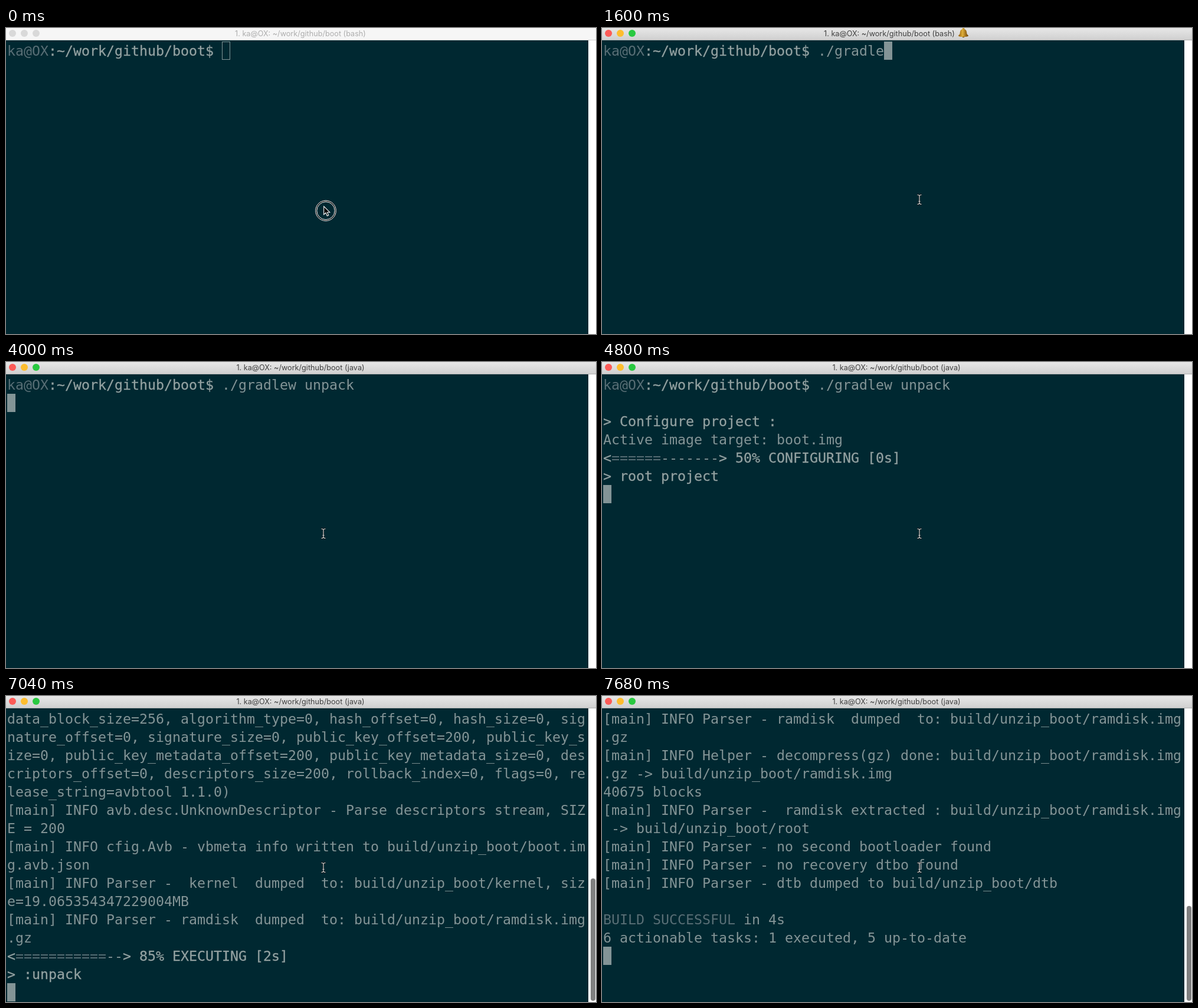
Recreate the animation shown at these times as an HTML page with a canvas. Size 1000x520 px, loop 8 s.

```html
<!DOCTYPE html>
<html lang="en">
<head>
<meta charset="utf-8">
<title>Terminal</title>
<style>
html, body { margin: 0; width: 100%; height: 100%; overflow: hidden; background: #002831; }
canvas { display: block; width: 1000px; height: 520px; }
</style>
</head>
<body>
<canvas id="stage" width="1000" height="520"></canvas>
<script>
const ctx = document.getElementById('stage').getContext('2d');
const LOOP = 8000, COLS = 70, CELL = 14, ROW = 31, LEFT = 2, TOP = 23;
const MONO = '23.25px "DejaVu Sans Mono", monospace';
const SANS = '12.65px Inter, sans-serif';
const BG = '#002831', FG = '#839496';
// Style marks inside terminal text: | plain, * bold, ^ green
const STYLES = { '|': FG, '*': '#93a1a1', '^': '#586e75' };

const PROMPT = '^ka@OX*:~/work/github/boot$| ';
const PROMPT_COLS = 26;
const COMMAND = './gradlew unpack';
const TYPED = [[0, 0], [1120, 1], [1280, 3], [1600, 8], [2240, 10], [2880, 11], [3040, 13], [3200, 15], [3360, 16]];

const wrap = line => line.match(new RegExp(`.{1,${COLS}}`, 'g')) || [''];
const LOG = [
  'data_block_size=256, algorithm_type=0, hash_offset=0, hash_size=0, signature_offset=0, signature_size=0, public_key_offset=200, public_key_size=0, public_key_metadata_offset=200, public_key_metadata_size=0, descriptors_offset=0, descriptors_size=200, rollback_index=0, flags=0, release_string=avbtool 1.1.0)',
  '[main] INFO avb.desc.UnknownDescriptor - Parse descriptors stream, SIZE = 200',
  '[main] INFO cfig.Avb - vbmeta info written to build/unzip_boot/boot.img.avb.json',
  '[main] INFO Parser -  kernel  dumped  to: build/unzip_boot/kernel, size=19.065354347229004MB',
  '[main] INFO Parser - ramdisk  dumped  to: build/unzip_boot/ramdisk.img.gz',
  '[main] INFO Helper - decompress(gz) done: build/unzip_boot/ramdisk.img.gz -> build/unzip_boot/ramdisk.img',
  '40675 blocks',
  '[main] INFO Parser -  ramdisk extracted : build/unzip_boot/ramdisk.img -> build/unzip_boot/root',
  '[main] INFO Parser - no second bootloader found',
  '[main] INFO Parser - no recovery dtbo found',
  '[main] INFO Parser - dtb dumped to build/unzip_boot/dtb',
  '',
  '^BUILD SUCCESSFUL| in 4s',
  '6 actionable tasks: 1 executed, 5 up-to-date'
].flatMap(wrap);

function status(percent, phase, secs, task) {
  const done = Math.floor(percent * 13 / 100);
  const bar = '*<^' + '='.repeat(done) + '|' + '-'.repeat(13 - done);
  return [`${bar}*> ${percent}% ${phase} [${secs}s]`, `*> ${task}`];
}

// Terminal rows, cursor cell and scrollback length at time t
function screen(t) {
  if (t >= 7680) return { rows: LOG.slice(11), col: 0, total: 49 };
  if (t >= 7040) {
    const shift = t < 7200 ? 0 : 2;
    const rows = LOG.slice(shift, shift + 13).concat(status(85, 'EXECUTING', 2, ':unpack'));
    return { rows, col: 0, total: 38 + shift };
  }
  const count = TYPED.filter(k => t >= k[0]).pop()[1];
  const rows = [PROMPT + COMMAND.slice(0, count)];
  if (t < 3520) return { rows, col: PROMPT_COLS + count, row: 0 };
  if (t >= 4800) {
    rows.push('', '*> Configure project :', 'Active image target: boot.img');
    if (t < 4960) rows.push(...status(50, 'CONFIGURING', 0, 'root project'));
    else if (t < 5120) rows.push(...status(0, 'EXECUTING', 0, 'IDLE'));
    else rows.push(...status(85, 'EXECUTING', t < 5760 ? 0 : t < 6720 ? 1 : 2, ':unpack'));
  } else if (t >= 4640) {
    rows.push('', '*> Connecting to Daemon');
  }
  return { rows, col: 0 };
}

function drawRow(text, row) {
  let col = 0, mark = '|';
  for (const ch of text) {
    if (STYLES[ch]) { mark = ch; continue; }
    const x = LEFT + col++ * CELL, y = TOP + row * ROW + 24;
    ctx.fillStyle = ctx.strokeStyle = STYLES[mark];
    ctx.fillText(ch, x, y);
    if (mark === '*') ctx.strokeText(ch, x, y);
  }
}

function circle(x, y, r, fill, stroke, width = 1) {
  ctx.beginPath();
  ctx.arc(x, y, r, 0, Math.PI * 2);
  ctx.lineWidth = width;
  if (fill) { ctx.fillStyle = fill; ctx.fill(); }
  if (stroke) { ctx.strokeStyle = stroke; ctx.stroke(); }
}

function drawBell(x, y) {
  ctx.save();
  ctx.translate(x, y);
  circle(0, 5.5, 2.2, '#6b430c');
  const gold = ctx.createLinearGradient(-7, 0, 7, 0);
  gold.addColorStop(0, '#a06a12');
  gold.addColorStop(0.4, '#e0b03a');
  gold.addColorStop(1, '#7d4e0c');
  ctx.fillStyle = gold;
  ctx.fill(new Path2D('M0-8.500C2-8.500 2-7 2-6.500C6-5 5.500-1 6 1.500C6.500 3 8.500 3.500 8.500 5C6 7-6 7-8.500 5C-8.500 3.500-6.500 3-6 1.500C-5.500-1-6-5-2-6.500C-2-7-2-8.500 0-8.500Z'));
  ctx.restore();
}

function drawTitleBar(t) {
  const active = t >= 160, bell = t >= 1600 && t < 2240;
  const shade = ctx.createLinearGradient(0, 0, 0, 20);
  shade.addColorStop(0, active ? '#e7e7e7' : '#f6f6f6');
  shade.addColorStop(1, active ? '#d0d0d0' : '#f6f6f6');
  ctx.fillStyle = shade;
  ctx.fillRect(0, 0, 1000, 20);
  ctx.fillStyle = active ? '#b0b0b0' : '#d0d0d0';
  ctx.fillRect(0, 20, 1000, 1);

  const lights = active ? ['#fc5b57', '#fdbd2e', '#29c940'] : Array(3).fill('#d9d9d9');
  lights.forEach((fill, i) => circle(11 + 20 * i, 9, 6, fill));

  ctx.font = SANS;
  ctx.textAlign = 'center';
  ctx.fillStyle = active ? '#404040' : '#adadad';
  ctx.fillText(`1. ka@OX: ~/work/github/boot (${t < 4000 ? 'bash' : 'java'})`, bell ? 487 : 499, 14);
  ctx.textAlign = 'left';
  if (bell) drawBell(612.5, 8.5);
}

function drawArrow(x, y) {
  ctx.save();
  ctx.translate(x, y);
  const arrow = new Path2D('M.7 1V15L4 12L6.300 17.300L8.700 16.300L6.500 11.200H10.800Z');
  ctx.fillStyle = '#000';
  ctx.strokeStyle = '#fff';
  ctx.lineWidth = 1.1;
  ctx.fill(arrow);
  ctx.stroke(arrow);
  ctx.restore();
}

function drawPointer(t) {
  if (t < 160) {
    circle(542, 310.5, 16.5, null, '#000', 2);
    circle(542, 310.5, 17.3, null, '#fff');
    circle(542, 310.5, 15.2, null, '#fff');
    drawArrow(538, 302);
  } else if (t < 320) {
    drawArrow(532, 283);
  } else {
    const beam = new Path2D('M534.500 283.500Q538 283.500 538 286V297Q538 299.500 534.500 299.500M541.500 283.500Q538 283.500 538 286M538 297Q538 299.500 541.500 299.500M536.500 294.500H539.500');
    ctx.strokeStyle = '#101010';
    ctx.lineWidth = 2.4;
    ctx.stroke(beam);
    ctx.strokeStyle = '#d4d8d8';
    ctx.lineWidth = 1.2;
    ctx.stroke(beam);
  }
}

function drawScrollbar(total) {
  ctx.fillStyle = '#fff';
  ctx.fillRect(987, 21, 13, 499);
  if (!total) return;
  const height = 208 * 38 / total;
  ctx.fillStyle = '#7f7f7f';
  ctx.beginPath();
  ctx.roundRect(991, 518 - height, 8, height, 4);
  ctx.fill();
}

function draw(t) {
  const { rows, col, row = rows.length, total } = screen(t);
  ctx.fillStyle = BG;
  ctx.fillRect(0, 0, 1000, 520);
  drawScrollbar(total);
  drawTitleBar(t);

  ctx.font = MONO;
  ctx.lineWidth = 0.3;
  rows.forEach(drawRow);

  const x = LEFT + col * CELL, y = TOP + row * ROW;
  ctx.fillStyle = ctx.strokeStyle = FG;
  ctx.lineWidth = 1;
  if (t < 160) ctx.strokeRect(x + 0.5, y + 0.5, CELL - 1, ROW - 1);
  else ctx.fillRect(x, y, CELL, ROW);
  drawPointer(t);
}

const start = performance.now();
function tick() {
  draw((performance.now() - start) % LOOP);
  requestAnimationFrame(tick);
}
tick();
</script>
</body>
</html>
```
